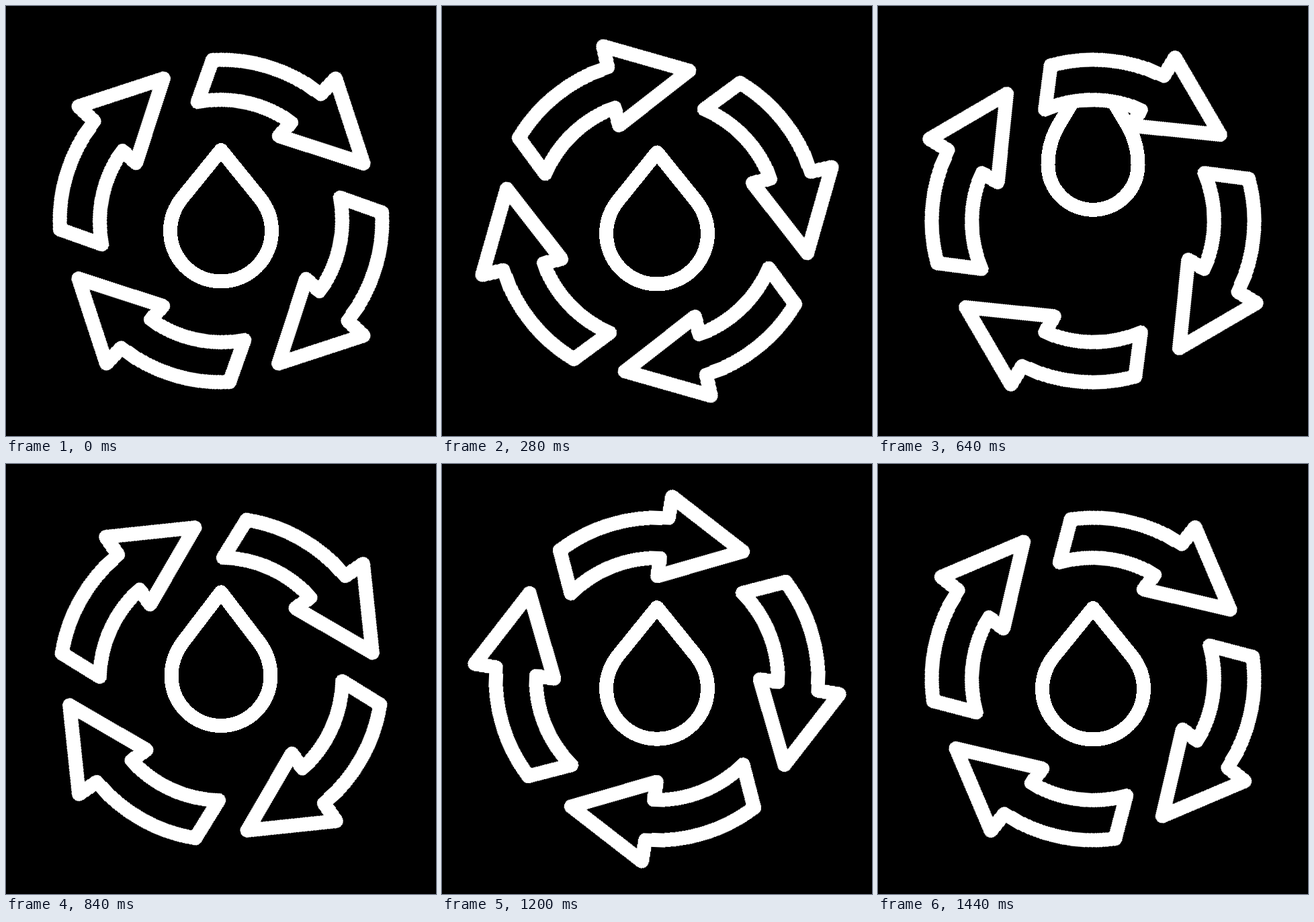
An HTML page for the animation above (1.48 s loop, 640 by 640 pixels).

```html
<!DOCTYPE html>
<html lang="en">
<head>
<meta charset="utf-8">
<title>Water cycle</title>
<style>
  html, body { margin: 0; width: 100%; height: 100%; overflow: hidden; background: #000; }
  svg { display: block; width: 100%; height: 100%; }
  .line { fill: none; stroke: #fff; stroke-width: 21; stroke-linejoin: round; shape-rendering: crispEdges; }
  #ring { transform-origin: 320px 320px; animation: spin 1480ms linear infinite; }
  #drop { animation: fall 1480ms infinite; }

  @keyframes spin {
    from { transform: rotate(-53.5deg); }
    to { transform: rotate(126.5deg); }
  }
  /* Speeds out below the ring, then glides in from above; thin and long while fast. */
  @keyframes fall {
    0% {
      d: path("M320 214.5L262 286C251 300 244.5 316 244.5 334.5A75.5 75.5 0 0 0 395.5 334.5C395.5 316 389 300 378 286Z");
      animation-timing-function: cubic-bezier(1, 0, .76, 0);
    }
    36.48% {
      d: path("M320 487.5L266.2 582.6C256 601.1 250 622.4 250 647A70 70 0 0 0 390 647C390 622.4 384 601.1 373.8 582.6Z");
      animation-timing-function: step-end;
    }
    36.49% {
      d: path("M320 -105.5L278.9 4.8C271.1 26.3 266.5 51 266.5 79.5A53.5 53.5 0 0 0 373.5 79.5C373.5 51 368.9 26.3 361.1 4.8Z");
      animation-timing-function: cubic-bezier(.123, 1, .203, 1);
    }
    100% {
      d: path("M320 214.5L262 286C251 300 244.5 316 244.5 334.5A75.5 75.5 0 0 0 395.5 334.5C395.5 316 389 300 378 286Z");
    }
  }
</style>
</head>
<body>
<svg viewBox="0 0 640 640">
  <defs>
    <clipPath id="well"><circle cx="320" cy="320" r="180"/></clipPath>
    <path id="arrow" d="M-152.6-185A240 240 0 0 1 7-240L11-272L119.5-195L-6-153L-3-180A180 180 0 0 0-133.3-121.7Z"/>
  </defs>
  <g clip-path="url(#well)">
    <path id="drop" class="line"/>
  </g>
  <g id="ring" class="line">
    <use href="#arrow" transform="translate(320 320)"/>
    <use href="#arrow" transform="translate(320 320) rotate(90)"/>
    <use href="#arrow" transform="translate(320 320) rotate(180)"/>
    <use href="#arrow" transform="translate(320 320) rotate(270)"/>
  </g>
</svg>
<script>
  // Advance the keyframes at 25 pictures per second.
  const LOOP = 1480, STEP = 40;
  const anims = document.getAnimations();
  anims.forEach(a => a.pause());

  function draw() {
    const t = Math.floor(performance.now() % LOOP / STEP) * STEP;
    anims.forEach(a => { a.currentTime = t; });
    requestAnimationFrame(draw);
  }
  draw();
</script>
</body>
</html>
```
